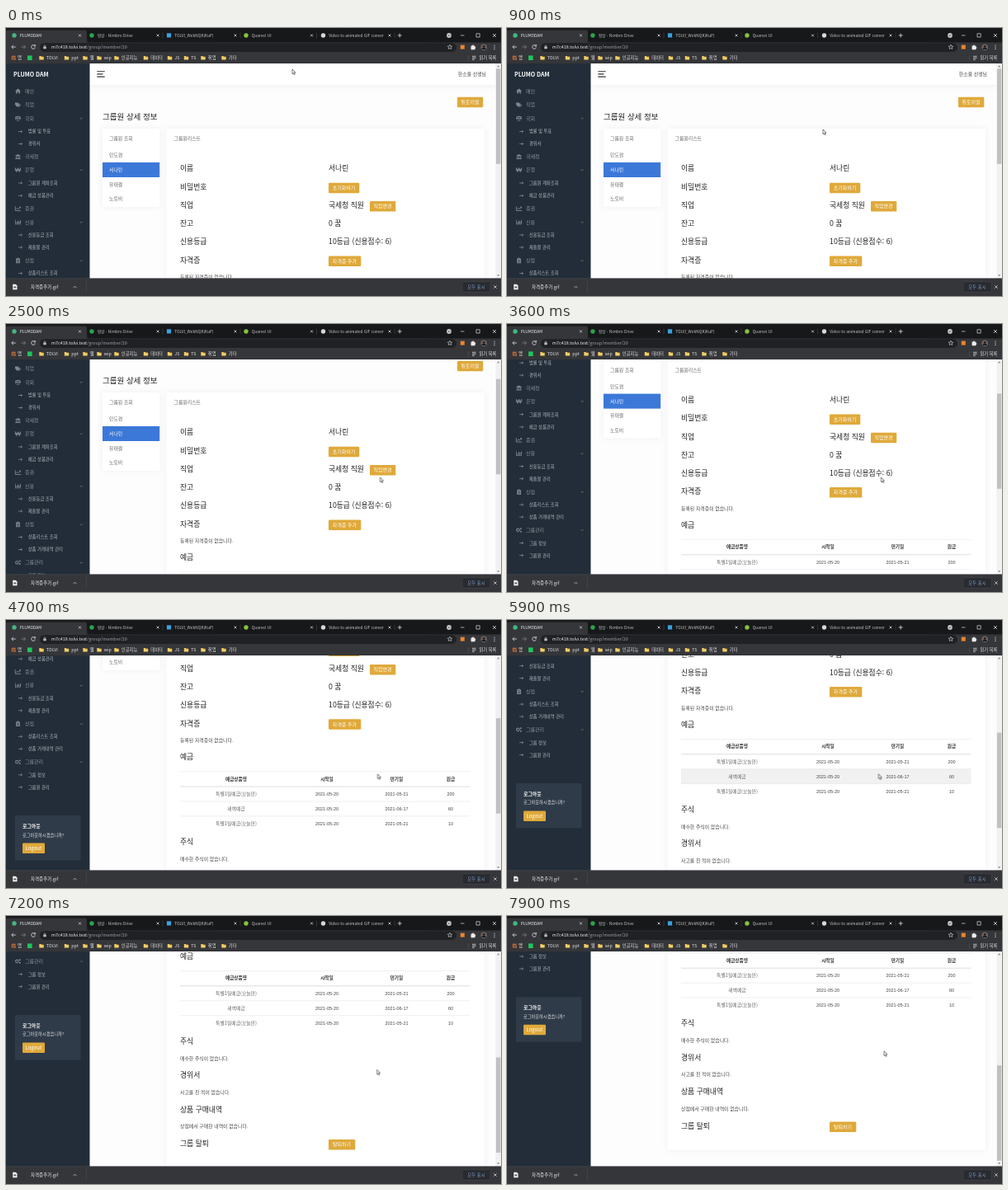
Recreate the animation shown at these times as an HTML page. Size 600x325 px, loop 8000 ms.

```html
<!DOCTYPE html>
<html lang="ko">
<head>
<meta charset="utf-8">
<title>PLUMODAM</title>
<style>
@property --scroll { syntax: "<number>"; inherits: true; initial-value: 0; }
html, body { margin: 0; width: 100%; height: 100%; overflow: hidden; background: #fff; }
svg {
  display: block; width: 600px; height: 325px;
  font-family: "Noto Sans CJK KR", "Noto Sans CJK JP", "Noto Sans CJK", "Noto Sans", sans-serif;
  animation: scroll 8s infinite;
}
.latin { font-family: "Liberation Sans", sans-serif; }
.line { fill: none; }
.card { filter: drop-shadow(0 0 3.5px rgba(40, 50, 80, .07)); }
.page { transform: translateY(calc(var(--scroll) * -1px)); }
#thumb { transform: translateY(calc(var(--scroll) * .447px)); }
#cursor { animation: move 8s infinite ease-in-out; }
#hover { animation: hover 8s infinite step-end; }
@keyframes scroll {
  0%, 18.75% { --scroll: 0; }
  21.875%, 32.5% { --scroll: 39; }
  35%, 48.1% { --scroll: 78.4; }
  50.6%, 55% { --scroll: 117.2; }
  57.5%, 68.1% { --scroll: 156.2; }
  70.6%, 75% { --scroll: 195.4; }
  77.5%, 86.9% { --scroll: 234.4; }
  90%, 93.1% { --scroll: 273.4; }
  96.25%, 100% { --scroll: 295; }
}
@keyframes move {
  0%, 1% { transform: translate(347px, 50px); }
  5%, 7.5% { transform: translate(362px, 82px); }
  11.25%, 22.5% { transform: translate(383px, 123px); }
  30%, 46% { transform: translate(453.5px, 186px); }
  53%, 83.9% { transform: translate(450.4px, 186.7px); }
  85%, 93% { transform: translate(449.6px, 186.3px); }
  98.5%, 100% { transform: translate(457px, 163.7px); }
}
@keyframes hover {
  0% { opacity: 0; }
  69.6% { opacity: 1; }
  76.2%, 100% { opacity: 0; }
}
</style>
</head>
<body>
<svg id="stage" viewBox="0 0 600 325" lang="ko"></svg>
<script>
const GOLD = '#dfa93a';

// All text is placed by its vertical centre.
const text = (x, y, str, size, fill, extra = '') =>
  `<text x="${x}" y="${y + size * .36}" font-size="${size}" fill="${fill}" ${extra}>${str}</text>`;
const mid = (x, y, str, size, fill, extra = '') => text(x, y, str, size, fill, 'text-anchor="middle" ' + extra);
const rect = (x, y, w, h, fill, r = 0, extra = '') =>
  `<rect x="${x}" y="${y}" width="${w}" height="${h}" rx="${r}" fill="${fill}" ${extra}/>`;
const dot = (x, y, r, fill) => `<circle cx="${x}" cy="${y}" r="${r}" fill="${fill}"/>`;
const line = (d, color, width = .8) => `<path class="line" d="${d}" stroke="${color}" stroke-width="${width}"/>`;
const cross = (x, y, r, color) => line(`M${x - r} ${y - r}l${2 * r} ${2 * r}m0 ${-2 * r}l${-2 * r} ${2 * r}`, color);
const button = (x, y, w, str, extra) =>
  rect(x, y - 6.2, w + .3, 12.5, GOLD, 1.2) + mid(x + w / 2, y, str, 6, '#fff', extra);

// Sidebar icons, drawn around (0, 0).
const icons = {
  home: '<path d="M-3.5 0L0-3 3.5 0H2.4V3H.8V1H-.8V3H-2.4V0Z"/>',
  tags: '<path d="M-3.5-2.5H-.5L2.2.2-.5 3-3.5 0ZM.5-2.5L3.6.4 1.2 3 .6 2.4 2.7.2 0-2.5Z"/>',
  scale: '<path d="M-.4-3H.4V2.4H2V3H-2V2.4H-.4ZM-3-2.4H3V-1.8H-3ZM-3.6.3L-2.2-2-.8.3C-1 1.6-3.4 1.6-3.6.3ZM.8.3L2.2-2 3.6.3C3.4 1.6 1 1.6.8.3Z"/>',
  bank: '<path d="M-3.2-1.3L0-3 3.2-1.3V-.7H-3.2ZM-2.5-.4H-1.5V1.7H-2.5ZM-.5-.4H.5V1.7H-.5ZM1.5-.4H2.5V1.7H1.5ZM-3.2 2H3.2V3H-3.2Z"/>',
  won: line('M-3.3-2.6L-1.7 2.6 0-2.4 1.7 2.6 3.3-2.6M-3.7-.6H3.7M-3.7.7H3.7', '#7f8891', .9),
  trend: line('M-3.2-2.6V2.5H3.5M-2 .9L-.6-.7.6.5 3-2M1.5-2H3V-.5', '#7f8891', .9),
  bars: '<path d="M-3.5-2.8H-2.8V2.1H3.5V2.8H-3.5ZM-2-.2H-1V1.5H-2ZM-.5-1.8H.5V1.5H-.5ZM1-.8H2V1.5H1ZM2.4-2.4H3.4V1.5H2.4Z"/>',
  shop: '<path d="M-2.4-2.4H-1V-3.2H1V-2.4H2.4V3.3H-2.4Z"/>' + line('M-1.3-.8H1.3M-1.3.6H1.3M-1.3 2H1.3', '#222d39', .6),
  cogs: '<circle cx="-1.2" r="1.7" fill="none" stroke="#7f8891" stroke-width="1.4" stroke-dasharray="1.2 .3"/><circle cx="2.3" cy="-1.7" r="1"/><circle cx="2.3" cy="1.8" r="1"/>'
};

// [y, label, icon, has submenu]; entries without an icon are submenu links.
const menu = [
  [76.5, '메인', 'home'], [93, '직업', 'tags'], [109.5, '국회', 'scale', 1],
  [125.5, '법률 및 투표'], [140.5, '경위서'], [156, '국세청', 'bank'],
  [172, '은행', 'won', 1], [188, '그룹원 계좌조회'], [203.3, '예금 상품관리'],
  [219, '증권', 'trend'], [235.5, '신용', 'bars', 1], [251, '신용등급 조회'],
  [266, '제출물 관리'], [282, '상점', 'shop', 1], [297.5, '상품리스트 조회'],
  [312.5, '상품 거래내역 관리'], [328.3, '그룹관리', 'cogs', 1],
  [344, '그룹 정보'], [359, '그룹원 관리']
];
const menuItem = ([y, label, icon, open]) => icon
  ? `<g transform="translate(14.5 ${y})" fill="#7f8891">${icons[icon]}</g>` + text(23, y, label, 6, '#8a939b') +
    (open ? line(`M89.7 ${y - .6}l1.5 1.5 1.5-1.5`, '#7f8891', .7) : '')
  : line(`M15 ${y}h4.6m-1.5-1.4l1.5 1.4-1.5 1.4`, '#a0a8af', .6) + text(26.7, y, label, 5.35, '#b2b9bf');

const sidebar = text(9, 56, 'PLUMO DAM', 7, '#fff', 'font-weight="700"') + menu.map(menuItem).join('') +
  rect(11, 393.3, 79.5, 54.5, '#2f3b48', 1) +
  text(20, 406, '로그아웃', 5.9, '#fff', 'font-weight="700"') +
  text(20, 417, '로그아웃하시겠습니까?', 5.2, '#e3e6e9') + button(20, 433, 26.7, 'Logout', 'font-weight="500"');

const header = rect(101, 43, 493, 26, '#fff', 0, 'style="filter:drop-shadow(0 1px 3.5px rgba(40,50,80,.08))"') +
  line('M110.3 52.7h9.4M110.3 55.9h7.2M110.3 59.1h9.4', '#333', 1.1) +
  text(582, 56, '한소율 선생님', 5.9, '#444', 'text-anchor="end"');

const card = (x, w, h) => rect(x, 122, w, h, '#fff', 2, 'class="card"');

const members = card(117, 69.5, 95) +
  text(125, 134, '그룹원 조회', 5.9, '#666') + rect(117, 163, 69.2, 18, '#3c78d8') +
  ['민도겸', '서나린', '유태결', '노토비'].map((name, i) =>
    text(125, 154.3 + i * 17.6, name, 5.9, i === 1 ? '#fff' : '#666')).join('');

const big = (x, y, str) => text(x, y, str, 8.8, '#222');
const note = (y, str) => text(211, y, str, 5.9, '#444');
const columns = [279, 389, 473.5, 539];
const cells = (y, row, render) => row.map((str, i) => render(columns[i], y, str, i)).join('');
const deposits = [
  ['특별1일예금(오늘만)', '2021-05-20', '2021-05-21', '200'],
  ['새벽예금', '2021-05-20', '2021-06-17', '60'],
  ['특별1일예금(오늘만)', '2021-05-20', '2021-05-21', '10']
];
const table = rect(211, 376, 351.5, 18, '#f1f1f1', 0, 'id="hover"') +
  line('M211 340h351.5M211 376.2h351.5M211 394h351.5', '#e4e5e7', .6) + line('M211 358.2h351.5', '#d9dbde', .9) +
  cells(348.7, ['예금상품명', '시작일', '만기일', '원금'],
    (x, y, s) => mid(x, y, s, 5.7, '#333', 'font-weight="700"')) +
  deposits.map((row, r) => cells(367.2 + r * 18, row, (x, y, s, i) =>
    mid(x, y, s, i ? 5.5 : 5.8, i ? '#444' : '#666', i ? 'class="latin"' : ''))).join('');

const detail = card(194.5, 385.5, 457) +
  text(203.5, 134, '그룹원리스트', 5.9, '#666') +
  ['이름', '비밀번호', '직업', '잔고', '신용등급', '자격증'].map((s, i) => big(211, 170.3 + i * 22.25, s)).join('') +
  big(391, 170.3, '서나린') + button(391, 194, 37, '초기화하기') +
  big(391, 214.8, '국세청 직원') + button(441, 216.3, 31, '직업변경') +
  big(391, 237, '0 꿈') + big(391, 259.3, '10등급 (신용점수: 6)') + button(391, 282.7, 39, '자격증 추가') +
  note(302, '등록된 자격증이 없습니다.') + big(211, 322.3, '예금') + table +
  big(211, 425.3, '주식') + note(446, '매수한 주식이 없습니다.') +
  big(211, 466.7, '경위서') + note(487.2, '사고를 친 적이 없습니다.') +
  big(211, 508, '상품 구매내역') + note(528.6, '상점에서 구매한 내역이 없습니다.') +
  big(211, 549.5, '그룹 탈퇴') + button(391, 550.7, 32, '탈퇴하기');

const page =
  `<g class="page">${header}${button(547, 90, 31, '튜토리얼')}${text(117, 107.3, '그룹원 상세 정보', 9.5, '#222')}${members}${detail}</g>` +
  rect(0, 43, 101.5, 261, '#222d39') + `<g class="page">${sidebar}</g>` +
  rect(593.4, 43, 6.6, 261, '#f1f1f1') + rect(594, 49.3, 5.4, 115.5, '#c1c1c1', 0, 'id="thumb"') +
  '<path d="M595.2 47.3l1.5-1.7 1.5 1.7ZM595.2 299.2l1.5 1.7 1.5-1.7Z" fill="#777"/>';

// [icon x, title, icon colour, close x]
const tabs = [
  [10, 'PLUMODAM', '#41b883', 89.5], [104, '영상 - Nimbro Drive', '#2ba24c', 184],
  [197.5, 'TOLVI_WebNQK(KuP)', '#3aa0e0', 278], [291, 'Quarvel UI', '#85c440', 370.5],
  [384.5, 'Video to animated GIF conver', '#d8d8d8', 465]
];
const tabBar = rect(0, 0, 600, 18, '#17181a') +
  '<path d="M0 18V3.5Q0 2.5 1 2.5H95Q98 2.5 98 5.5V15Q98 18 101 18Z" fill="#35363a"/>' +
  tabs.map(([x, title, color, close], i) =>
    (i === 2 ? rect(x - 2.6, 6.3, 5.2, 5.2, color) : dot(x, 9, 2.7, color)) +
    text(x + 6.7, 9, title, 4.8, i ? '#c6c8cb' : '#f1f1f1') + cross(close, 9, 1.4, '#d5d6d8') +
    (i ? line(`M${close + 6} 5.5v7`, '#4a4c50', .5) : '')).join('') +
  line('M474.7 9h5M477.2 6.5v5', '#ddd') +
  dot(537, 9, 2.9, '#c4c5c7') + line('M535.8 8.5l1.2 1.2 1.2-1.2', '#222', .7) +
  line('M551 9h4.5M570 6.8h4.2v4.2h-4.2Z', '#ddd', .7) + cross(592, 9, 2, '#ddd');

const toolbar = rect(0, 17.5, 600, 25.5, '#35363a') + rect(41, 18.3, 505, 10.6, '#202124', 5.3) +
  line('M11.8 23h-5m2.2-2.2L6.8 23 9 25.2', '#e0e1e3') + line('M18.6 23h5m-2.2-2.2l2.2 2.2-2.2 2.2', '#85878a') +
  line('M35 21.5a2.4 2.4 0 1 0 .4 2M35.4 20v2h-2', '#e0e1e3') +
  rect(45.3, 22.5, 3.4, 2.7, '#bfc1c4', .3) + line('M46 22.6v-.8a1 1 0 0 1 2 0v.8', '#bfc1c4', .6) +
  text(55, 23.2, 'm7c418.tolvi.test<tspan fill="#9aa0a6">/group/member/20</tspan>', 5.4, '#f1f1f1') +
  line('M538 20.2l.8 1.9 2.1.1-1.6 1.3.5 2-1.8-1.1-1.8 1.1.5-2-1.6-1.3 2.1-.1Z', '#d5d6d8', .6) +
  rect(550.8, 20.6, 5, 5, '#e9842c') +
  '<path d="M563.6 21.5h1.5a.9.9 0 0 1 1.8 0h1.5v1.5a.9.9 0 0 1 0 1.8v1.4h-4.8Z" fill="#f1f1f1"/>' +
  dot(579.2, 23.3, 3.8, '#6c625d') + dot(579.2, 22.3, 1.3, '#241f20') +
  '<path d="M576.6 26a2.6 2.6 0 0 1 5.2 0Z" fill="#241f20"/>' +
  [21.2, 23.3, 25.4].map(y => dot(592, y, .6, '#e0e1e3')).join('');

const folders = [
  [43, 'TOLVI'], [73.5, 'ppt'], [96, '웹'], [113, 'wip'], [134, '인공지능'],
  [169.5, '데이터'], [198.5, 'JS'], [218.5, 'TS'], [239, '취업'], [264, '기타']
];
const appColors = ['#e8663c', '#eaa63b', '#e8663c'];
const bookmarks = [0, 1, 2].map(r => [0, 1, 2].map(c =>
    rect(6.8 + c * 1.8, 33.7 + r * 1.8, 1.3, 1.3, appColors[(r + c) % 3])).join('')).join('') +
  text(14, 36.3, '앱', 5.3, '#e3e4e6') + rect(26, 33.4, 5.6, 5.6, '#1ec55a') +
  folders.map(([x, name]) =>
    `<path d="M${x - 2.7} 34h2l.7.8h2.7v3.6h-5.4Z" fill="#f3cd63"/>` + text(x + 5.8, 36.3, name, 5.3, '#e3e4e6')).join('') +
  line('M560.5 33v6.5', '#5b5d61', .5) + line('M565 34.3h4.6M565 36.3h4.6M565 38.3h2.8', '#e0e1e3', .8) +
  text(573.5, 36.3, '읽기 목록', 5.3, '#e3e4e6');

const downloads = rect(0, 303.6, 600, 21.4, '#35363a') + line('M0 303.7h600', '#4b4c50', .5) +
  '<path d="M8.2 310.8h3.7l1.6 1.6v4.9H8.2Z" fill="#f1f1f1"/>' + rect(9.4, 313.4, 2.8, 2, '#5d6268') +
  text(30, 314, '자격증추가.gif', 5.5, '#f1f1f1') + line('M81.6 315l1.9-1.9 1.9 1.9', '#d5d6d8', .7) +
  line('M97.5 307v14', '#505256', .5) +
  rect(553, 307.7, 34, 12.5, '#292b30', 1.3, 'stroke="#484a4f" stroke-width=".5"') +
  mid(570, 314, '모두 표시', 5.4, '#7f9fd2') + cross(593, 314, 1.7, '#d5d6d8');

const cursor = '<path id="cursor" d="M0 0V5.7L1.3 4.5 2.2 6.6 3.2 6.2 2.3 4.1H4Z" fill="#fff" stroke="#222" stroke-width=".6"/>';

document.getElementById('stage').innerHTML =
  rect(0, 0, 600, 325, '#fdfdfe') + page + tabBar + toolbar + bookmarks + downloads + cursor;
</script>
</body>
</html>
```
